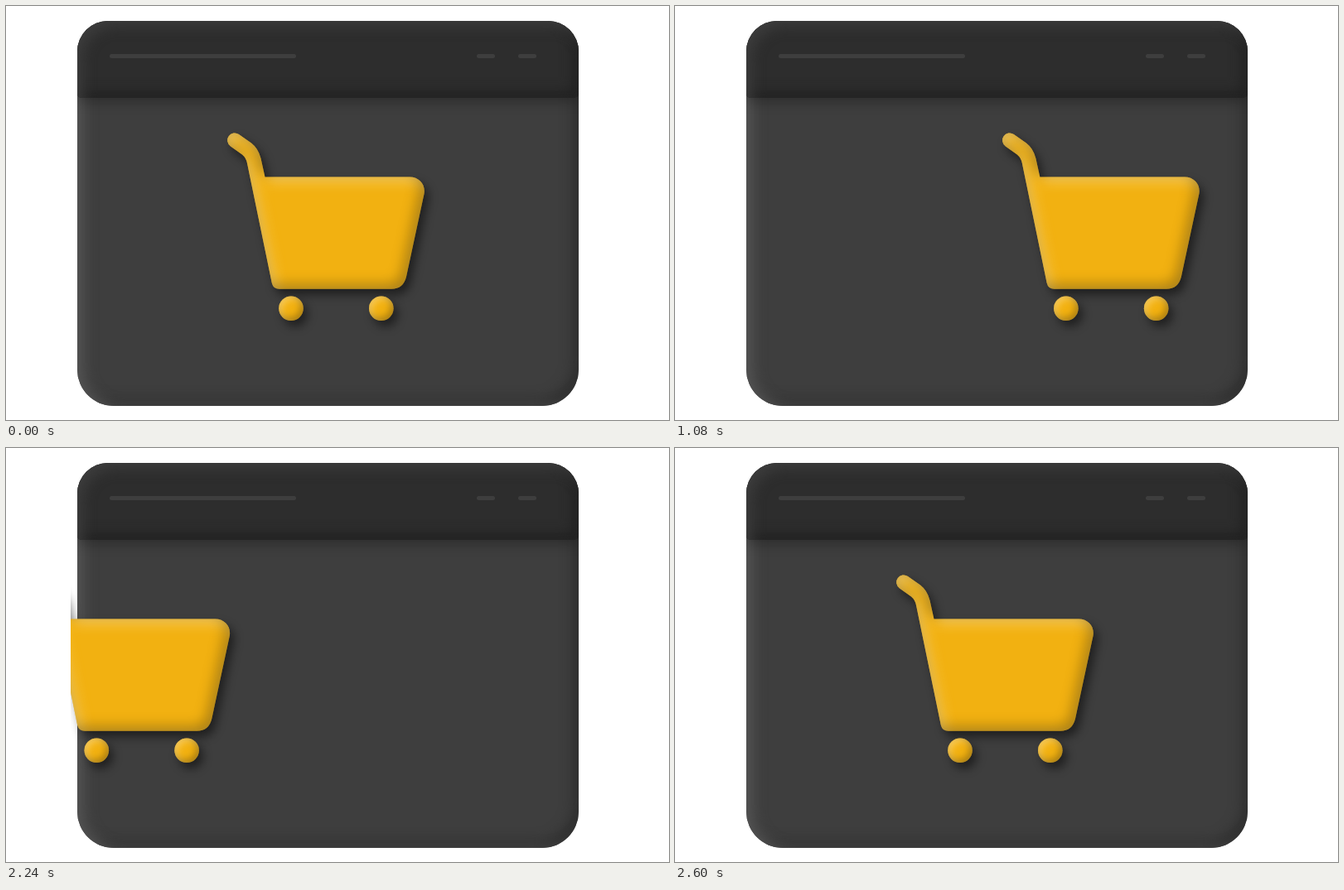
An HTML page that plays this animation: 800x500 px, repeating every 3.84 s.

```html
<!DOCTYPE html>
<html lang="en">
<head>
<meta charset="utf-8">
<title>Shopping cart</title>
<style>
  html, body { margin: 0; width: 100%; height: 100%; overflow: hidden; background: #fff; }
  div, svg { position: absolute; }
  svg { left: 0; top: 0; }
  .window {
    left: 86px; top: 18px; width: 605px; height: 465px;
    border-radius: 37px 37px 44px 44px; overflow: hidden; background: #3e3e3e;
    box-shadow: inset 10px 0 16px -2px #545454, inset -8px -8px 16px -2px #2e2e2e;
  }
  .header {
    left: 0; top: 0; width: 605px; height: 92.5px;
    border-radius: 37px 37px 5px 5px; background: #2d2d2d;
    box-shadow: inset 8px 8px 16px -2px #3d3d3d, inset -8px -8px 16px -2px #202020,
      0 4px 16px rgba(0, 0, 0, .3);
  }
  .bar { top: 39.5px; height: 5.5px; border-radius: 3px; background: #3e3e3e; }
</style>
</head>
<body>
<div class="window">
  <div class="header">
    <div class="bar" style="left:39px;width:225px"></div>
    <div class="bar" style="left:482px;width:22px"></div>
    <div class="bar" style="left:532px;width:22px"></div>
  </div>
</div>
<svg width="800" height="500" viewBox="0 0 800 500">
  <defs id="defs">
    <clipPath id="stage"><rect x="78" y="18" width="618" height="465"/></clipPath>
  </defs>
  <g clip-path="url(#stage)">
    <g id="cart" fill="#f2b111">
      <path filter="url(#big)" d="M281 155 L296 165.5 Q304.500 172 307.500 184 L312.500 206.500
        H487 C499 206.500 506.500 216 504.500 227 L483 327 Q479.500 341.800 465 341.800
        H330 Q322.500 341.800 320.800 334.500 L291 190 Q289.800 183.500 285 179.500
        L271 169.500 A8.700 8.700 0 0 1 281 155 Z"/>
      <circle filter="url(#small)" cx="344" cy="365.300" r="14.800"/>
      <circle filter="url(#small)" cx="452.800" cy="365.300" r="14.800"/>
    </g>
  </g>
</svg>
<script>
  const LOOP = 3840, STEP = 40, MOVE = 520, LEAVE = 800, ENTER = 2080;
  const cart = document.getElementById('cart');

  const inset = (shift, blur, color, opacity, name) => `
    <feOffset in="SourceAlpha" dx="${shift}" dy="${shift}"/>
    <feGaussianBlur stdDeviation="${blur}" result="soft"/>
    <feFlood flood-color="${color}" flood-opacity="${opacity}"/>
    <feComposite operator="out" in2="soft"/>
    <feComposite operator="in" in2="SourceAlpha" result="${name}"/>`;

  // Light from the upper left, shade at the lower right, plus a drop shadow
  const bevel = (id, shift, blur) => `
    <filter id="${id}" filterUnits="userSpaceOnUse" x="200" y="100" width="380" height="340"
      color-interpolation-filters="sRGB">
      ${inset(shift, blur, '#ffdc80', .72, 'light')}
      ${inset(-shift, blur, '#000', .3, 'dark')}
      <feOffset in="SourceAlpha" dx="5" dy="7"/>
      <feGaussianBlur stdDeviation="6"/>
      <feComponentTransfer result="shadow">
        <feFuncR type="linear" slope="0"/><feFuncG type="linear" slope="0"/>
        <feFuncB type="linear" slope="0"/><feFuncA type="linear" slope=".5"/>
      </feComponentTransfer>
      <feMerge>
        <feMergeNode in="shadow"/><feMergeNode in="SourceGraphic"/>
        <feMergeNode in="light"/><feMergeNode in="dark"/>
      </feMerge>
    </filter>`;
  document.getElementById('defs').insertAdjacentHTML('beforeend',
    bevel('big', 5, 8) + bevel('small', 3, 4));

  function offset(t) {
    if (t < LEAVE) return 0;
    if (t < LEAVE + MOVE) return 441 * ((t - LEAVE) / MOVE) ** 2;
    if (t < ENTER) return 900;
    const left = Math.max(0, 1 - (t - ENTER) / MOVE);
    return -431 * left ** 1.653;
  }

  const start = performance.now();
  function draw() {
    const t = (performance.now() - start) % LOOP;
    const x = offset(Math.floor(t / STEP) * STEP);
    cart.setAttribute('transform', `translate(${x.toFixed(2)} 0)`);
    requestAnimationFrame(draw);
  }
  draw();
</script>
</body>
</html>
```
